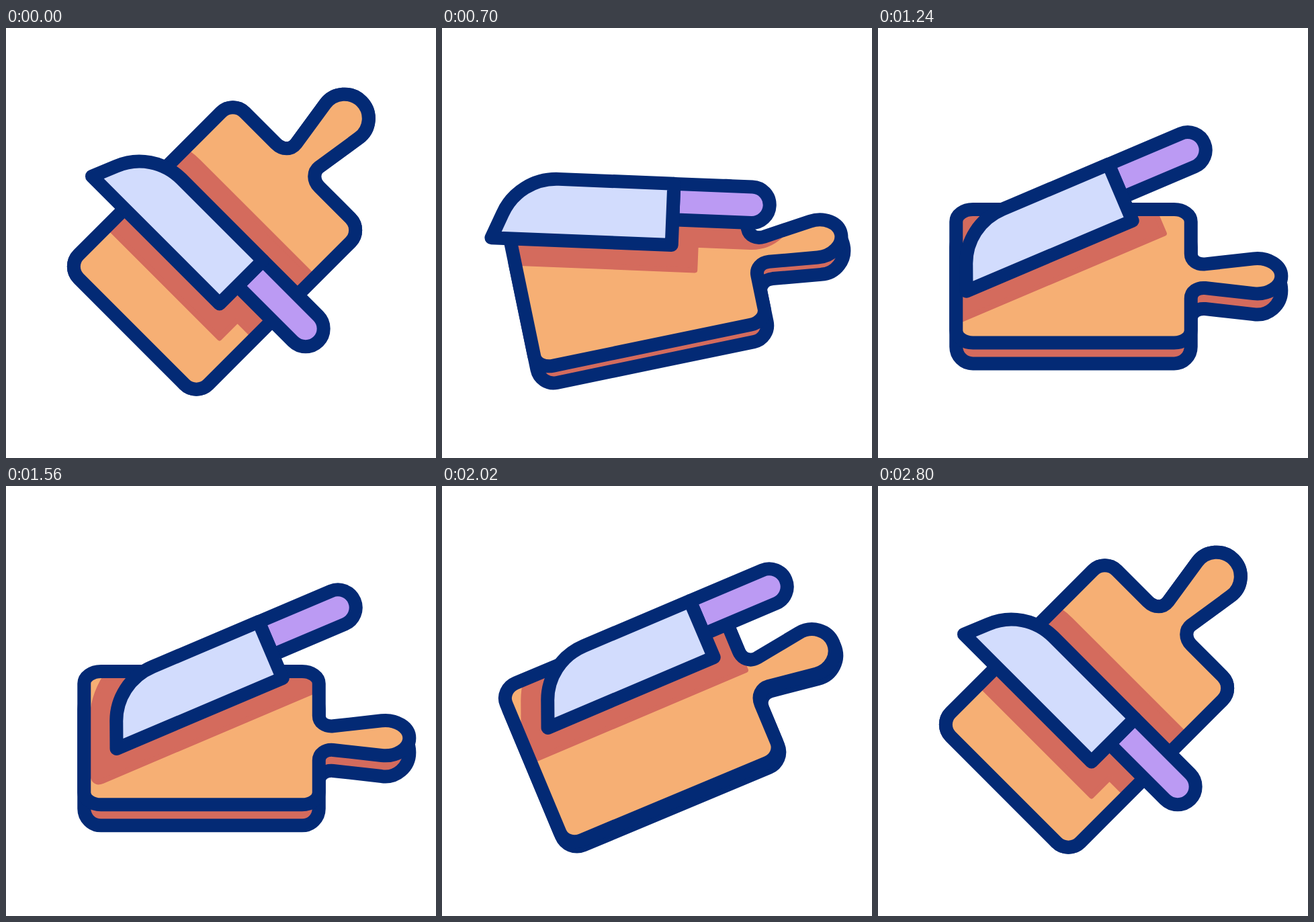
Write an HTML page that moves like this. It is 640 px wide and 640 px high and loops after 2880 ms.

```html
<!DOCTYPE html>
<html lang="en">
<head>
<meta charset="utf-8">
<title>Knife and board</title>
<style>
  html, body { margin: 0; width: 100%; height: 100%; overflow: hidden; background: #fff; }
  svg { display: block; width: 100%; height: 100%; }
  .line { stroke: #032a75; stroke-width: 20; stroke-linejoin: round; }
  .wood { fill: #f6af74; }
  .shade { fill: #d46b5d; }
  #shadow { stroke: #d46b5d; stroke-width: 8; stroke-linejoin: round; }
</style>
</head>
<body>
<svg viewBox="0 0 640 640">
  <defs>
    <clipPath id="boardClip"><path id="clipShape"/></clipPath>
  </defs>
  <path id="slab" class="line shade"/>
  <path id="wood" class="wood"/>
  <g clip-path="url(#boardClip)">
    <path id="shadow" class="shade" d="M-46 17 L-18.2 -49.8 C0 -94 45 -127.3 97 -127.3
      H385.3 A62.7 62.7 0 0 1 385.3 -1.8 H304.5 V36 H-38 Q-53.9 36 -46 17 Z"/>
  </g>
  <path id="rim" class="line" fill="none"/>
  <g id="knife" class="line">
    <path fill="#bb9af3" d="M268.5 -91.2 H385.3 A26.7 26.7 0 0 1 385.3 -37.8 H268.5 Z"/>
    <path fill="#d2dcfd" d="M0 0 L15 -36 C28 -69 60 -91.3 97 -91.3 H268.5 V0 Z"/>
  </g>
</svg>
<script>
const LOOP = 2880;
const CHOP = { first: 960, period: 290, count: 3, depth: 18.5, press: 9, pressTime: 130 };

const el = id => document.getElementById(id);

// Eased progress from 0 to 1 between two times.
function phase(time, start, end) {
  const p = Math.min(1, Math.max(0, (time - start) / (end - start)));
  return p * p * (3 - 2 * p);
}

// Outline around the board's centre: flat squeezes its height, round its curves.
function boardPath(flat, round) {
  const w = 174.75, h = 136.4 * flat, r = 25, ry = r * round;
  const tip = 35.6 * flat, tipTop = tip - 71.2 * round;
  const corner = (x, y) => `A${r} ${ry} 0 0 1 ${x} ${y}`;
  const neck = [46, 32, 23, 24.5].map(y => y * flat);
  return `M${-w} ${ry - h} ${corner(r - w, -h)} H${w - r} ${corner(w, ry - h)}
    V${-neck[0]} C${w} ${-neck[1]} 184 ${-neck[2]} 196 ${-neck[3]} L268 ${tipTop}
    A36 ${36 * round} 0 1 1 268 ${tip}
    L196 ${neck[3]} C184 ${neck[2]} ${w} ${neck[1]} ${w} ${neck[0]}
    V${h - ry} ${corner(w - r, h)} H${r - w} ${corner(-w, h - ry)} Z`;
}

// Knife depth and board press for the repeated cuts.
function chopping(time) {
  const { first, period, count, depth, press, pressTime } = CHOP;
  const since = time - (first - period / 2);
  if (since < 0 || since > count * period) return { knife: 0, board: 0 };
  const hit = (since % period) - period / 2 + 10;
  return {
    knife: depth * (1 - Math.cos(2 * Math.PI * since / period)) / 2,
    board: hit > 0 && hit < pressTime ? press * Math.sin(Math.PI * hit / pressTime) : 0
  };
}

function boardPose(time) {
  const back = phase(time, 1805, 2405);
  const away = phase(time, 200, 560) - back;
  const overshoot = back - phase(time, 2405, 2800);
  return {
    x: 310.5 - 19.5 * away,
    y: 328 + 41 * away - 15 * overshoot + chopping(time).board,
    angle: -45 * (1 - phase(time, 400, 852) + phase(time, 1830, 2210)),
    tilt: phase(time, 400, 806) - phase(time, 1830, 2116)
  };
}

function knifePose(time) {
  const hop = phase(time, 1850, 2020);
  const fall = phase(time, 2020, 2280);
  const overshoot = fall - phase(time, 2280, 2495);
  const slide = phase(time, 1260, 1400);
  return {
    x: 446 + 15 * phase(time, 400, 700) + 33 * slide - 7 * hop - 41 * phase(time, 2020, 2220),
    y: 447.5 - 284 * (phase(time, 480, 848) - fall) - 13.5 * (hop - fall)
      + 88.5 * overshoot + chopping(time).knife,
    angle: 45 - 68 * (phase(time, 490, 850) - phase(time, 2030, 2270))
  };
}

const transform = ({ x, y, angle }) => `translate(${x} ${y}) rotate(${angle})`;

function place(id, pose, path) {
  el(id).setAttribute('transform', pose);
  if (path) el(id).setAttribute('d', path);
}

function draw(time) {
  const board = boardPose(time);
  const flat = 1 - 0.2725 * board.tilt;
  const pose = transform(board);
  const outline = boardPath(flat, flat);
  for (const id of ['wood', 'rim', 'clipShape']) place(id, pose, outline);
  place('slab', `${pose} translate(0 ${31 * board.tilt})`, boardPath(flat, 1));

  // The knife turns around the round end of its handle.
  const grip = `${transform(knifePose(time))} translate(-385.3 64.5)`;
  place('knife', grip);
  place('shadow', grip);
}

function tick() {
  draw(performance.now() % LOOP);
  requestAnimationFrame(tick);
}
tick();
</script>
</body>
</html>
```
